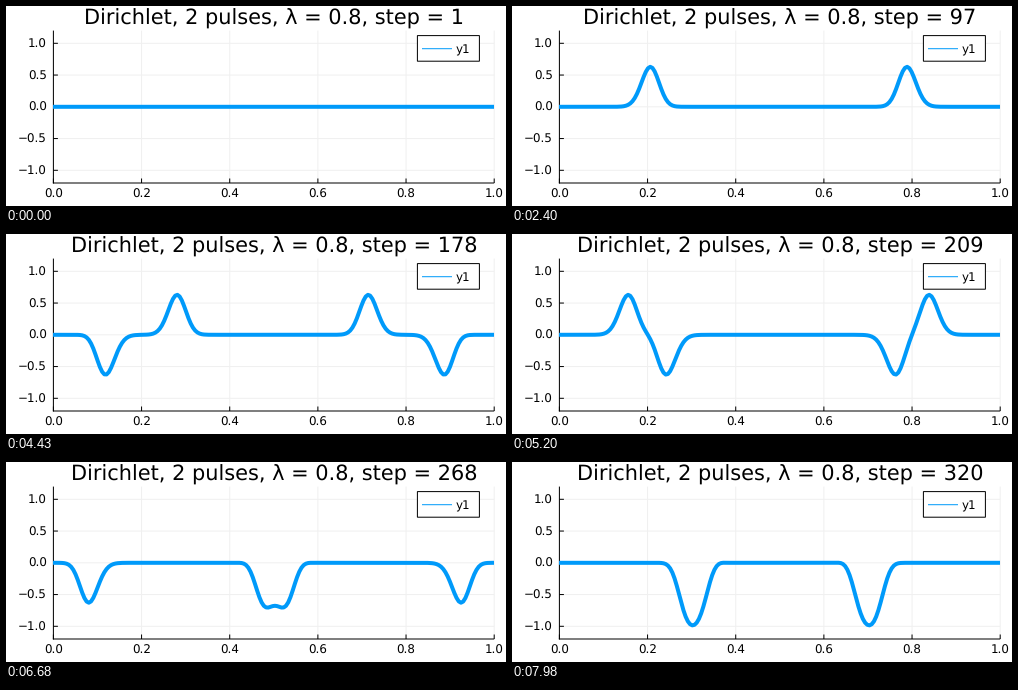
Write a matplotlib script that moves like this. It is 500x200 px and loops after 8000 ms.

```python
import matplotlib.pyplot as plt
import numpy as np
from matplotlib.animation import FuncAnimation
from matplotlib.lines import Line2D
from matplotlib.patches import Rectangle

W, H, DPI = 500, 200, 100
PT = 72 / DPI                                  # points per pixel
LEFT, RIGHT, TOP, BOTTOM = 47.4, 488.2, 24.6, 177
STEPS, NODES, COURANT = 320, 200, 0.8
SOURCE, PEAKS, SIGMA = 99, (0.1, 0.5), 0.02    # pulse times in seconds
BLUE, GRID = "#009afa", "#f0f0f0"

plt.rcParams["font.family"] = "DejaVu Sans"
plt.rcParams["text.hinting"] = "none"


def simulate():
    """Staggered-grid wave with fixed ends and two Gaussian source pulses."""
    dt = COURANT / (NODES - 1)
    e, h = np.zeros(NODES), np.zeros(NODES - 1)
    history = []
    for n in range(1, STEPS + 1):
        h += COURANT * np.diff(e)
        e[1:-1] += COURANT * np.diff(h)
        e[SOURCE] += sum(np.exp(-0.5 * ((n * dt - peak) / SIGMA) ** 2) for peak in PEAKS)
        history.append(e.copy())
    return history


fig = plt.figure(figsize=(W / DPI, H / DPI), dpi=DPI, facecolor="white")
ax = fig.add_axes([LEFT / W, 1 - BOTTOM / H, (RIGHT - LEFT) / W, (BOTTOM - TOP) / H])
ax.set(xlim=(0, 1), ylim=(-1.2, 1.2), xticks=[], yticks=[])
ax.set_zorder(2)
ax.patch.set_visible(False)
for spine in ax.spines.values():
    spine.set_visible(False)


def px(x):
    return LEFT + x * (RIGHT - LEFT)


def py(y):
    return (TOP + BOTTOM) / 2 - y * (BOTTOM - TOP) / 2.4


def label(x, y, text, size=11.9, ha="center"):
    return fig.text(x / W, 1 - y / H, text, fontsize=size * PT, ha=ha, va="baseline")


def segment(x0, y0, x1, y1, color="black", z=1):
    fig.add_artist(Line2D([x0 / W, x1 / W], [1 - y0 / H, 1 - y1 / H], color=color,
                          lw=PT, zorder=z, solid_capstyle="butt", snap=False))


for k in range(6):
    x = px(k / 5)
    segment(x, TOP, x, BOTTOM, GRID, z=0)
    segment(x, BOTTOM, x, BOTTOM - 4.5)
    label(x, 191.8, f"{k / 5:.1f}")
for k in range(-2, 3):
    y = py(k / 2)
    segment(LEFT, y, RIGHT, y, GRID, z=0)
    segment(LEFT, y, LEFT + 4.5, y)
    label(41, y + 4.3, f"{k / 2:.1f}".replace("-", "\u2212"), ha="right")
segment(LEFT, TOP, LEFT, BOTTOM + 0.5)
segment(LEFT - 0.5, BOTTOM, RIGHT, BOTTOM)

wave, = ax.plot([], [], color=BLUE, lw=4 * PT, solid_joinstyle="round")
title = label((LEFT + RIGHT) / 2, 18.2, "", 20.83)

# Legend
fig.add_artist(Rectangle((411.4 / W, 1 - 55.2 / H), 62 / W, 25.6 / H, fc="white",
                         ec="black", lw=PT, zorder=3, snap=False))
segment(416, 42.7, 446, 42.7, BLUE, z=4)
label(450, 47.2, "y1", ha="left").set_zorder(4)

grid_x = np.linspace(0, 1, NODES)
states = simulate()


def draw(i):
    wave.set_data(grid_x, states[i])
    title.set_text(f"Dirichlet, 2 pulses, λ = {COURANT}, step = {i + 1}")
    return wave, title


anim = FuncAnimation(fig, draw, frames=STEPS, interval=25, repeat=True, repeat_delay=0)
plt.show()
```
